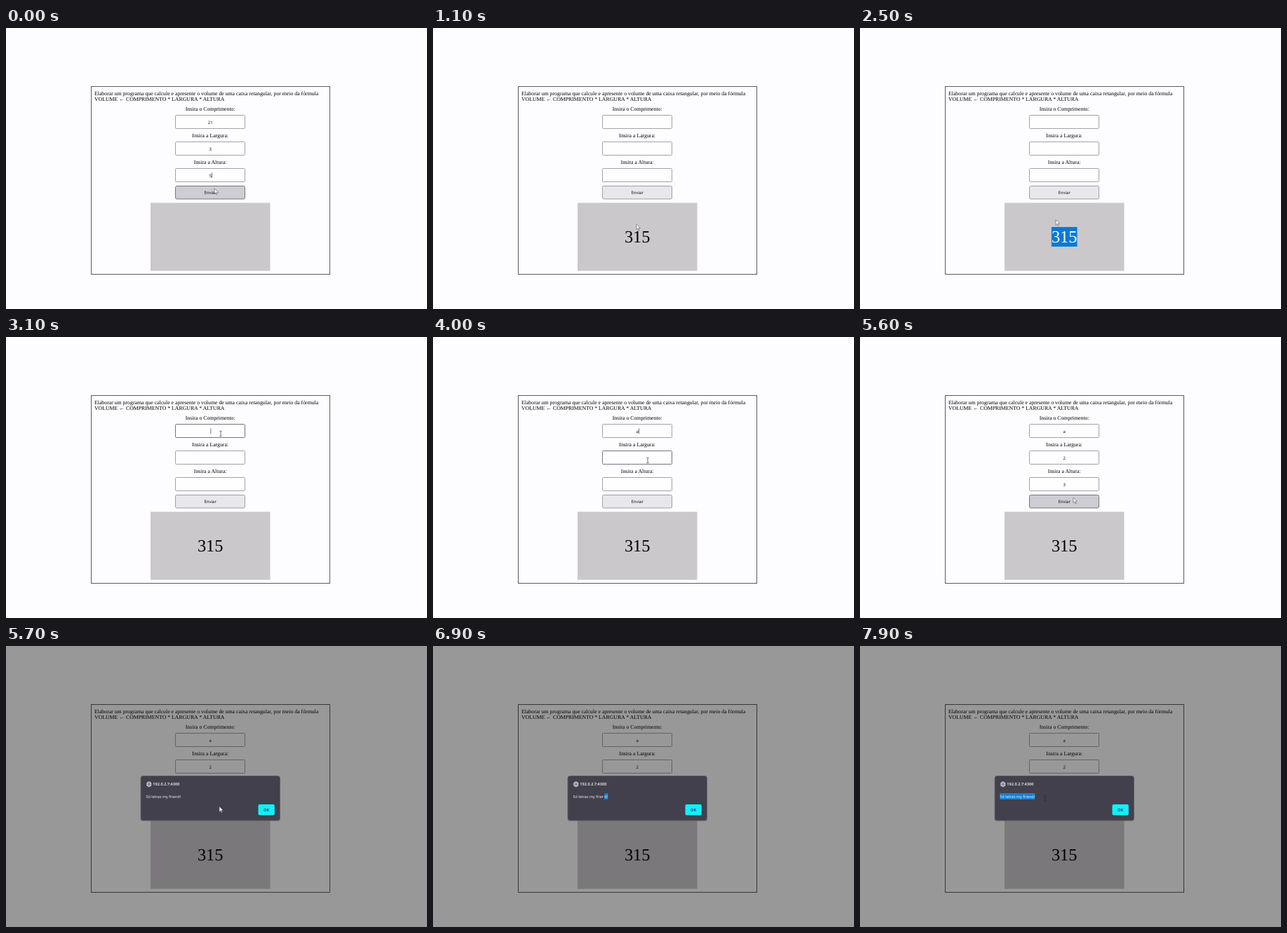
An HTML page that plays this animation: 600x401 px, repeating every 8000 ms.

```html
<!DOCTYPE html>
<html lang="pt">
<head>
<meta charset="utf-8">
<title>Volume</title>
<style>
  html, body { margin: 0; width: 100%; height: 100%; overflow: hidden; background: #fdfcfe; }
  svg { display: block; width: 600px; height: 401px; text-rendering: geometricPrecision; }
  .serif { font: 7.79px "Liberation Serif", serif; }
  .sans { font: 6px "Open Sans", sans-serif; }
  .mid { text-anchor: middle; }
  .big { font-size: 24.4px; }
</style>
</head>
<body>
<svg id="stage" viewBox="0 0 600 401" xmlns="http://www.w3.org/2000/svg">
  <defs>
    <clipPath id="sumClip"><rect id="sumClipBox" y="284" height="28"/></clipPath>
    <clipPath id="msgClip"><rect id="msgClipBox" y="210" height="9"/></clipPath>
  </defs>
  <rect width="600" height="401" fill="#fdfcfe"/>
  <rect x="121.5" y="83.5" width="340" height="268" fill="none" stroke="#5c5a5e"/>
  <g class="serif">
    <text x="126" y="95.5">Elaborar um programa que calcule e apresente o volume de uma caixa retangular, por meio da fórmula</text>
    <text x="126" y="104.4">VOLUME ← COMPRIMENTO * LARGURA * ALTURA</text>
  </g>
  <g id="fields"></g>
  <rect id="button" x="241.5" y="225.5" width="99" height="18.5" rx="2"/>
  <text class="sans mid" x="291.2" y="237.1">Enviar</text>
  <rect x="206" y="249.5" width="170.5" height="97" fill="#cac8ca"/>
  <g id="sum" class="serif mid">
    <text class="big" x="291.2" y="306.3">315</text>
    <rect id="sumMark" y="284" height="28" fill="#0a7ad3"/>
    <text class="big" x="291.2" y="306.3" fill="#fff" clip-path="url(#sumClip)">315</text>
  </g>
  <g id="dialog">
    <rect width="600" height="401" opacity=".4"/>
    <rect x="191.5" y="185" width="199.5" height="65" rx="4" opacity=".25"/>
    <rect x="192.3" y="185.6" width="198" height="63.2" rx="3.5" fill="#42404c"/>
    <g fill="none" stroke="#f4f3f6" stroke-width=".7">
      <circle cx="203.8" cy="197.3" r="3.4"/>
      <ellipse cx="203.8" cy="197.3" rx="1.5" ry="3.4"/>
      <path d="M200.7 196.1h6.2M200.7 198.5h6.2"/>
    </g>
    <g class="sans" fill="#fbfafc">
      <text x="209.3" y="199.4" style="font-size:5.6px;font-weight:600">192.0.2.7:4300</text>
      <text x="199.5" y="216.5" style="font-size:5.5px">Só letras my friend!</text>
      <rect id="msgMark" y="210" height="9" fill="#1b7fd0"/>
      <text x="199.5" y="216.5" style="font-size:5.5px" clip-path="url(#msgClip)">Só letras my friend!</text>
    </g>
    <rect x="359.5" y="226" width="23.3" height="15.4" rx="2" fill="#10f0fc"/>
    <text class="sans mid" x="371.1" y="235.9" fill="#1f2b38" style="font-size:5.6px;font-weight:600">OK</text>
  </g>
  <path id="arrow" d="M0 0V7.6L1.8 6L3 8.8L4.2 8.3L3 5.6H5.4Z" fill="#fff" stroke="#55535a" stroke-width=".6"/>
  <path id="beam" d="M-1.7 -3.6H-.5L0 -3.2L.5 -3.6H1.7M0 -3.2V3.2M-1.7 3.6H-.5L0 3.2L.5 3.6H1.7" fill="none" stroke="#2b2a2e" stroke-width=".7"/>
</svg>
<script>
const LOOP = 8000, STEP = 100;
const $ = id => document.getElementById(id);

// Pointer stops: time, x, y
const route = [
  [0, 297, 229], [900, 297, 229], [1100, 290, 280], [1400, 307, 300],
  [1500, 307, 300], [2100, 275, 300], [2400, 277, 298], [2500, 279, 273.5],
  [2900, 300, 137], [3100, 306, 138], [3200, 306, 138], [3500, 306, 175],
  [3700, 306, 176], [4000, 306, 176], [4400, 306, 176], [4800, 304, 210],
  [5000, 304, 210], [5300, 304, 229], [6100, 304, 229], [6700, 252, 214],
  [6800, 252, 214], [7400, 200.5, 214], [7500, 200.5, 214], [7900, 264, 217]
];

const fields = ["o Comprimento", "a Largura", "a Altura"].map((name, i) => {
  const y = 124.5 + 38 * i;
  const g = document.createElementNS("http://www.w3.org/2000/svg", "g");
  g.innerHTML =
    `<text class="serif mid" x="291.2" y="${y - 6.9}">Insira ${name}:</text>
     <rect x="241.5" y="${y}" width="99" height="19" rx="1" fill="#fefdff"/>
     <text class="sans mid" x="291.2" y="${y + 12.2}"></text>
     <path d="M0 ${y + 6}v7.4" stroke="#111" stroke-width=".6"/>`;
  $("fields").append(g);
  const [, box, value, caret] = g.children;
  return { y, box, value, caret };
});

function pointerAt(t) {
  let i = 1;
  while (i < route.length - 1 && route[i][0] < t) i++;
  const [t0, x0, y0] = route[i - 1], [t1, x1, y1] = route[i];
  const k = Math.min(1, (t - t0) / (t1 - t0));
  return { x: x0 + (x1 - x0) * k, y: y0 + (y1 - y0) * k };
}

const within = (p, x, y, w, h) => p.x >= x && p.x <= x + w && p.y >= y && p.y <= y + h;
const show = (el, on) => el.setAttribute("visibility", on ? "visible" : "hidden");

function mark(name, left, right) {
  for (const el of [$(name + "Mark"), $(name + "ClipBox")]) {
    el.setAttribute("x", left);
    el.setAttribute("width", Math.max(0, right - left));
  }
}

function valuesAt(t) {
  if (t < 700) return ["21", "3", "5"];
  return [t >= 3700 ? "a" : "", t >= 4500 ? "2" : "", t >= 5000 ? "3" : ""];
}

function focusAt(t) {
  if (t < 600) return 2;
  if (t < 3000 || t >= 5500) return -1;
  return t < 4200 ? 0 : t < 4800 ? 1 : 2;
}

function draw(t) {
  const p = pointerAt(t);
  const open = t >= 5700;
  const focus = focusAt(t);
  const values = valuesAt(t);
  let typing = false;

  fields.forEach((f, i) => {
    const hover = !open && within(p, 241, f.y, 100, 19);
    typing = typing || hover;
    f.box.setAttribute("stroke", hover ? "#757380" : "#a3a1a9");
    f.value.textContent = values[i];
    const end = 291.2 + values[i].length * 1.72 + .6;
    f.caret.setAttribute("transform", `translate(${end} 0)`);
    show(f.caret, i === focus);
  });

  const over = open || within(p, 241, 225, 100, 19);
  $("button").setAttribute("fill", t === 600 ? "#b1b0b8" : over ? "#cfcdd4" : "#e8e7ec");
  $("button").setAttribute("stroke", over ? "#77757f" : "#a09ea8");

  show($("sum"), t >= 700);
  const digits = t < 1600 || t >= 2900 ? 0 : Math.min(3, Math.ceil((t - 1550) / 180));
  mark("sum", 309.5 - 12.2 * digits, 309.5);

  $("dialog").style.display = open ? "" : "none";
  mark("msg", t < 6900 ? 249.3 : t >= 7400 ? 199.2 : Math.min(249.3, p.x), 249.3);

  const onSum = t >= 1300 && t < 2500;
  const onText = t >= 6600;
  const beam = typing || onSum || onText;
  show($("beam"), beam);
  show($("arrow"), !beam);
  $(beam ? "beam" : "arrow").setAttribute("transform", `translate(${p.x} ${p.y})`);
}

const start = performance.now();
function tick() {
  const t = (performance.now() - start) % LOOP;
  draw(Math.floor(t / STEP) * STEP);
  requestAnimationFrame(tick);
}
draw(0);
requestAnimationFrame(tick);
</script>
</body>
</html>
```
